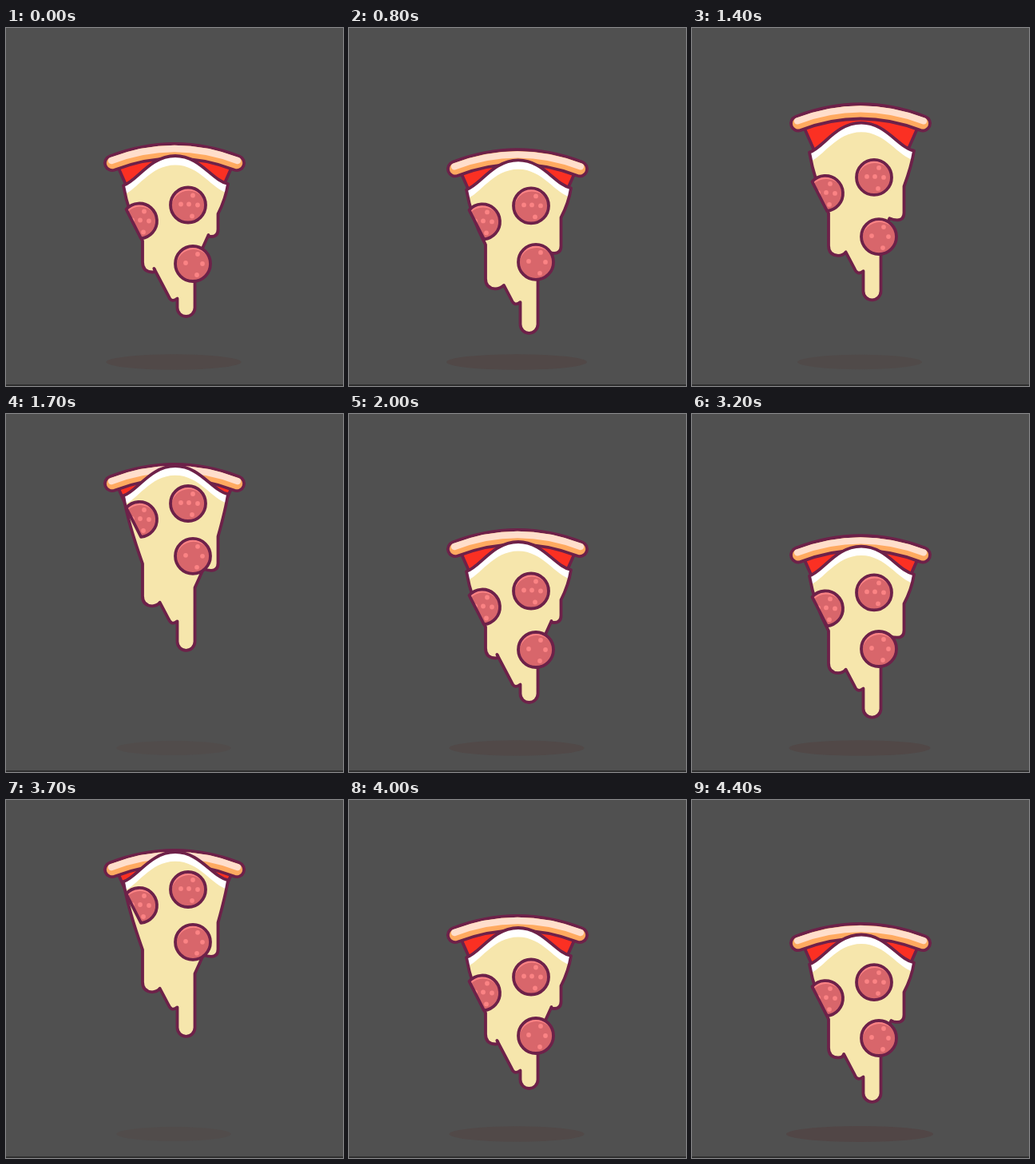
Recreate the animation shown at these times as an HTML page with a canvas. Size 422 px wide and 448 px high, loop 4.5 s.

```html
<!DOCTYPE html>
<html lang="en">
<head>
<meta charset="utf-8">
<title>Jumping pizza slice</title>
<style>
  html, body { margin: 0; width: 100%; height: 100%; overflow: hidden; background: #505050; }
  canvas { display: block; }
</style>
</head>
<body>
<canvas id="stage" width="422" height="448"></canvas>
<script>
const ctx = document.getElementById('stage').getContext('2d');
const TAU = Math.PI * 2;
const LOOP = 4500, STEP = 100;
const CYCLE = 2000, TAKEOFF = 1200, RISE = 400, FALL = 200;
const LINE = '#6d2149', LIGHT = '#fb8384', MEAT = '#d8666b';
const SPOTS = [[-9, -1], [12, 0], [6, -12], [5, 14]];

// Each part follows the jump with its own delay and height,
// then settles from `dip` with a swing of strength `swing`.
const PARTS = {
  crust: { rest: 150.5, lag: 3, height: 117, dip: -7.5, swing: 7 },
  top: { rest: 165.7, lag: 25, height: 117, dip: -5.7, swing: 9 },
  meat: { rest: 223.5, lag: 50, height: 119, dip: -2, swing: 19 },
  low: { rest: 294, lag: 60, height: 121, dip: 1, swing: 18 },
  base: { rest: 345.5, lag: 25, height: 98, dip: -5, swing: 10 },
  tip: { rest: 380, lag: 25, height: 98, dip: -19, swing: -20 },
  shade: { rest: 88.5, lag: 5, height: 22, dip: -4, swing: 13 }
};

const clamp = k => Math.min(1, Math.max(0, k));
const ease = k => (1 - Math.cos(Math.PI * clamp(k))) / 2;

function lift(t) {
  if (t < RISE) return ease(t / RISE);
  return 1 - clamp((t - RISE) / FALL) ** 2;
}

function settle(t, dip, swing) {
  const angle = TAU * t / 1200;
  return Math.exp(-t / 300) * (dip * Math.cos(angle) + swing * Math.sin(angle));
}

function poseAt(time) {
  const t = time % CYCLE;
  const pose = {};
  for (const [name, p] of Object.entries(PARTS)) {
    pose[name] = p.rest - p.height * lift(t - TAKEOFF - p.lag)
      + settle(t, p.dip, p.swing) + p.dip * ease((t - 1750) / 250);
  }
  return pose;
}

function outline(path, fill) {
  if (fill) {
    ctx.fillStyle = fill;
    ctx.fill(path);
  }
  ctx.strokeStyle = LINE;
  ctx.lineWidth = 3.8;
  ctx.stroke(path);
}

function dot(x, y, r, color) {
  ctx.fillStyle = color;
  ctx.beginPath();
  ctx.arc(x, y, r, 0, TAU);
  ctx.fill();
}

function drawShadow(r) {
  ctx.fillStyle = `rgba(82, 69, 68, ${clamp((r - 55) / 45)})`;
  ctx.beginPath();
  ctx.ellipse(210, 418, r, 5 + r * 0.055, 0, 0, TAU);
  ctx.fill();
}

function drawSauce(y) {
  const p = new Path2D();
  p.moveTo(139, y + 28);
  p.lineTo(154, y + 62);
  p.lineTo(269, y + 62);
  p.lineTo(284, y + 28);
  p.quadraticCurveTo(211, y - 4, 139, y + 28);
  outline(p, '#fb3023');
}

function crustStroke(y, width, color, inset = 0) {
  ctx.beginPath();
  ctx.moveTo(133 - inset, y + 26);
  ctx.quadraticCurveTo(211, y - 4, 289 + inset, y + 26);
  ctx.lineWidth = width;
  ctx.strokeStyle = color;
  ctx.stroke();
}

function drawCrust(y) {
  crustStroke(y, 22, LINE);
  crustStroke(y, 14.4, '#ffaa60');
  crustStroke(y - 3, 8.4, '#ffdecb', 1);
}

function topEdge(p, y) {
  p.moveTo(147, y + 37);
  p.bezierCurveTo(164, y + 32, 180, y, 212, y);
  p.bezierCurveTo(243, y, 258, y + 31, 278, y + 35);
}

function cheesePath({ top, base, tip }) {
  const p = new Path2D();
  const rightY = tip - 102, leftY = tip - 60;
  topEdge(p, top);
  p.quadraticCurveTo(275, top + 54, 265.5, base - 108);
  p.lineTo(265.5, tip - 109);
  p.quadraticCurveTo(265.5, tip - 100, 257, tip - 100);
  p.quadraticCurveTo(252, tip - 100, 236.5 + (base - 44 - rightY) / 2.2, rightY);
  p.lineTo(236.5, base - 44);
  p.lineTo(236.5, tip - 11);
  p.arc(225.5, tip - 11, 11, 0, Math.PI);
  p.lineTo(214.5, base - 2);
  p.quadraticCurveTo(207, base + 4, 203.5, base - 5);
  p.lineTo(203.5 - (base - 5 - leftY) / 1.9, leftY);
  p.quadraticCurveTo(189, tip - 55.5, 183, tip - 55.5);
  p.quadraticCurveTo(171, tip - 56, 171, tip - 68);
  p.lineTo(171, base - 74);
  p.quadraticCurveTo(153, top + 72, 147, top + 37);
  p.closePath();
  return p;
}

function drawCheese(pose) {
  const p = cheesePath(pose);
  ctx.fillStyle = '#fff';
  ctx.fill(p);
  ctx.save();
  ctx.clip(p);
  const inner = new Path2D();
  topEdge(inner, pose.top + 11.5);
  inner.lineTo(300, 448);
  inner.lineTo(120, 448);
  inner.closePath();
  ctx.fillStyle = '#f6e6ac';
  ctx.fill(inner);
  ctx.restore();
  outline(p);
}

function drawMeat(x, y, spots, from = 0, to = TAU) {
  const p = new Path2D();
  p.arc(x, y, 22, from, to);
  p.closePath();
  ctx.save();
  ctx.clip(p);
  dot(x, y, 23, LIGHT);
  dot(x + 1, y + 4, 22, MEAT);
  for (const [dx, dy] of spots) dot(x + dx, y + dy, 2.9, LIGHT);
  ctx.restore();
  outline(p);
}

function draw(time) {
  const pose = poseAt(time);
  const five = [...SPOTS, [1, -1]];
  ctx.fillStyle = '#505050';
  ctx.fillRect(0, 0, 422, 448);
  ctx.fillStyle = '#303030';
  ctx.fillRect(0, 446, 422, 2);
  ctx.lineCap = ctx.lineJoin = 'round';
  drawShadow(pose.shade);
  drawSauce(pose.crust);
  drawCrust(pose.crust);
  drawCheese(pose);
  drawMeat(228, pose.meat, five);
  // Sliced off along a chord by the left edge.
  drawMeat(167, pose.meat + 20, five, TAU * 0.615, TAU * 1.235);
  drawMeat(234, pose.low, SPOTS);
}

const start = performance.now();
function tick() {
  const t = (performance.now() - start) % LOOP;
  draw(Math.floor(t / STEP) * STEP);
  requestAnimationFrame(tick);
}
tick();
</script>
</body>
</html>
```
